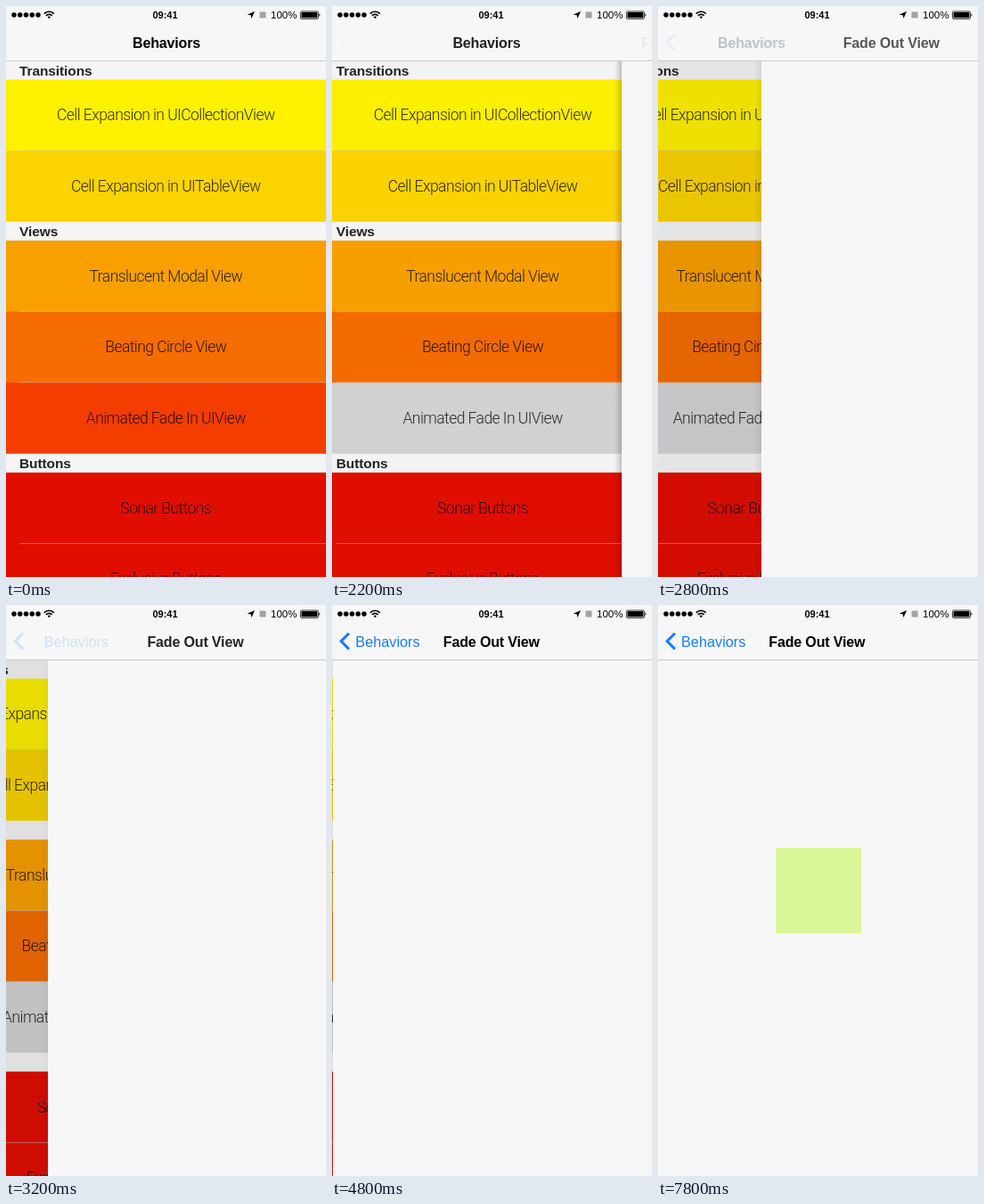
Recreate the animation shown at these times as an HTML page. Size 359 by 640 pixels, loop 8 s.

```html
<!DOCTYPE html>
<html lang="en">
<head>
<meta charset="utf-8">
<title>Behaviors</title>
<style>
  html, body { margin: 0; width: 100%; height: 100%; overflow: hidden; background: #f7f7f7; }
  svg { display: block; width: 359px; height: 640px; }
  text { font-family: "Liberation Sans", Arial, sans-serif; }
  .title { font-size: 16px; font-weight: 700; letter-spacing: -.15px; }
  .back { font-size: 16.3px; fill: #1a7cf9; }
  .head { font-size: 15.5px; font-weight: 700; letter-spacing: -.1px; fill: #222; }
  .cell { font: 300 17.5px Roboto, "Liberation Sans", sans-serif; letter-spacing: -.55px; fill-opacity: .8; text-anchor: middle; }
  .status { font-size: 11.5px; }
</style>
</head>
<body>
<svg viewBox="0 0 359 640">
  <defs>
    <linearGradient id="shade">
      <stop offset="0" stop-opacity="0"/>
      <stop offset="1" stop-opacity=".22"/>
    </linearGradient>
  </defs>

  <g id="list"></g>
  <rect id="dim" width="359" height="640"/>

  <g id="page">
    <rect id="edge" x="-8" y="62" width="8" height="578" fill="url(#shade)"/>
    <rect width="359" height="640" fill="#f7f7f7"/>
    <rect id="box" x="132" y="272" width="96" height="96" fill="#d9f799"/>
  </g>

  <rect width="359" height="62" fill="#f7f7f7"/>
  <rect y="61" width="359" height="1" fill="#cbcbcb"/>
  <text id="oldTitle" class="title" y="46.5">Behaviors</text>
  <text id="newTitle" class="title" y="46.5">Fade Out View</text>
  <g id="back">
    <path d="M19 31.8 10.2 40.6 19 49.4" fill="none" stroke="#1a7cf9" stroke-width="3"/>
    <text id="backLabel" class="back" y="46.5">Behaviors</text>
  </g>

  <g id="signal"></g>
  <g fill="none" stroke="#000" stroke-width="1.7">
    <path d="M42.8 8.6a7.6 7.6 0 0 1 11 0M44.9 10.9a4.7 4.7 0 0 1 6.8 0"/>
    <path d="M48.3 14.3l-1.7-2a2.5 2.5 0 0 1 3.4 0z" fill="#000" stroke="none"/>
  </g>
  <text class="status" x="178.5" y="14" text-anchor="middle" font-weight="700" style="font-size:11px">09:41</text>
  <path d="M279 6 275.4 14 274.7 10.3 270.6 9.7z"/>
  <rect x="284.5" y="6.5" width="7" height="7" fill="#a3a3a3"/>
  <text class="status" x="297" y="14">100%</text>
  <rect x="330.4" y="6" width="20" height="8.4" rx="1.5" fill="none" stroke="#000" stroke-width=".8"/>
  <rect x="331.5" y="7.1" width="17.8" height="6.2" rx=".6"/>
  <path d="M351.4 8.6q2 1.6 0 3.2z"/>
</svg>

<script>
  const LOOP = 8000, STEP = 200, WIDTH = 359;
  const PUSH_AT = 2030, NAV_AT = 2075, FADE_AT = 5340, FADE_TIME = 2460;
  const TITLE_OUT = 900, BACK_IN = 2700;
  const TOP = 61.4, CELL = 79.64, HEAD = 21.1, INSET = 15;
  const sections = [
    ["Transitions", ["Cell Expansion in UICollectionView", "#fff100"], ["Cell Expansion in UITableView", "#fbd400"]],
    ["Views", ["Translucent Modal View", "#f9a000"], ["Beating Circle View", "#f56c00"], ["Animated Fade In UIView", "#f43d00"]],
    ["Buttons", ["Sonar Buttons", "#e10e00"], ["Exclusive Buttons", "#e10e00"]]
  ];

  const $ = id => document.getElementById(id);
  function add(parent, tag, attrs, label = "") {
    const el = document.createElementNS("http://www.w3.org/2000/svg", tag);
    for (const key in attrs) el.setAttribute(key, attrs[key]);
    el.textContent = label;
    return parent.appendChild(el);
  }
  const set = (id, key, value) => $(id).setAttribute(key, value);

  const list = $("list");
  let selected, y = TOP;
  for (const [name, ...cells] of sections) {
    add(list, "rect", { y, width: WIDTH, height: HEAD + 1, fill: "#f5f5f5" });
    add(list, "text", { class: "head", x: INSET, y: y + 16.6 }, name);
    y += HEAD;
    cells.forEach(([label, fill], i) => {
      const rect = add(list, "rect", { y, width: WIDTH, height: CELL + 1, fill });
      if (label.startsWith("Animated")) selected = rect;
      if (i) add(list, "rect", { x: INSET, y: y - .5, width: WIDTH, height: .5, fill: "#c8c7cc" });
      add(list, "text", { class: "cell", x: 179.3, y: y + 45.9 }, label);
      y += CELL;
    });
  }

  for (let i = 0; i < 5; i++) add($("signal"), "circle", { cx: 9 + i * 6.75, cy: 10, r: 2.75 });

  // Share of the way still to go in a critically damped spring.
  function rest(t, start) {
    const u = Math.max(0, t - start) * .00304;
    return (1 + u) * Math.exp(-u);
  }
  const progress = (t, start, time) => Math.min(1, Math.max(0, (t - start) / time));
  const moveX = (id, x) => set(id, "transform", `translate(${x.toFixed(2)} 0)`);

  function draw(t) {
    const r = rest(t, PUSH_AT), n = rest(t, NAV_AT);
    moveX("list", -.3 * WIDTH * (1 - r));
    set("dim", "opacity", .1 * (1 - r));
    moveX("page", Math.ceil(WIDTH * r - .1));
    set("edge", "opacity", r < 1 ? r : 0);
    selected.setAttribute("fill", t > PUSH_AT ? "#d3d3d3" : "#f43d00");

    set("oldTitle", "x", 142 - 116 * (1 - n));
    set("oldTitle", "opacity", 1 - progress(t, NAV_AT, TITLE_OUT));
    set("newTitle", "x", 124.3 + 236 * n);
    set("newTitle", "opacity", 1 - n);
    set("backLabel", "x", 26 + 116 * n);
    set("back", "opacity", progress(t, NAV_AT, BACK_IN) ** 2);

    set("box", "opacity", progress(t, FADE_AT, FADE_TIME));
  }

  const start = performance.now();
  function tick() {
    const t = (performance.now() - start) % LOOP;
    draw(Math.floor(t / STEP) * STEP);
    requestAnimationFrame(tick);
  }
  tick();
</script>
</body>
</html>
```
